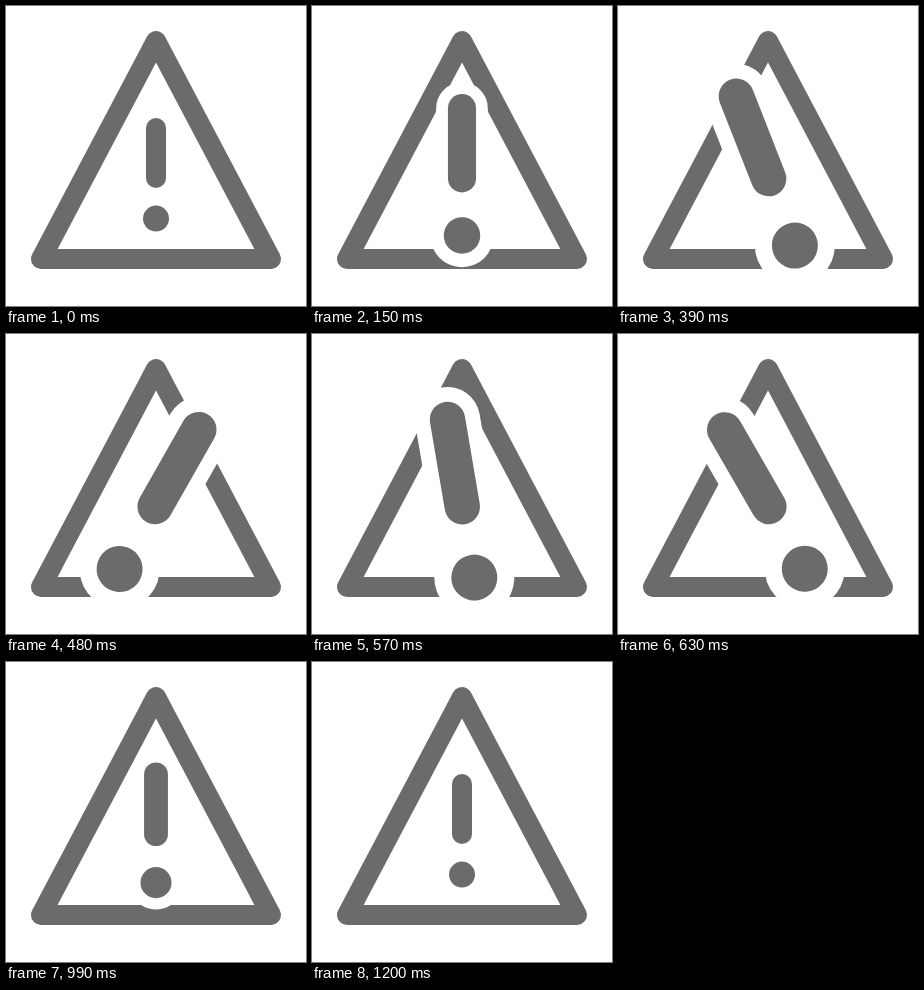
An HTML page for the animation above (3230 ms loop, 300 px wide and 300 px high).

```html
<!DOCTYPE html>
<html lang="en">
<head>
<meta charset="utf-8">
<title>Alert</title>
<style>
  html, body { margin: 0; height: 100%; overflow: hidden; background: #fff; }
  svg { display: block; width: 100%; height: 100%; }
  path { fill: none; stroke-linecap: round; stroke-linejoin: round; }
</style>
</head>
<body>
<svg viewBox="0 0 300 300">
  <path d="M150 35L265 253H35Z" stroke="#6b6b6b" stroke-width="20"/>
  <g id="mark">
    <!-- white halo cuts the triangle open -->
    <g fill="#fff" stroke="#fff">
      <path d="M0-49V1" stroke-width="36.8"/>
      <circle cy="41.6" r="22.6" stroke="none"/>
    </g>
    <g fill="#6b6b6b" stroke="#6b6b6b">
      <path d="M0-49V1" stroke-width="20"/>
      <circle cy="41.6" r="13" stroke="none"/>
    </g>
  </g>
</svg>
<script>
const LOOP = 3230, STEP = 30, END = 1200;
const mark = document.getElementById('mark');

// [time in ms, value]
const scaleKeys = [[0, 1], [290, 1.77], [780, 1.77], [1092, 1]];
const angleKeys = [[240, 0], [360, -30], [486, 30], [624, -30], [864, 0]];

const smooth = u => u * u * (3 - 2 * u);

function valueAt(keys, t) {
  if (t <= keys[0][0]) return keys[0][1];
  for (let i = 1; i < keys.length; i++) {
    const [t0, a] = keys[i - 1], [t1, b] = keys[i];
    if (t < t1) return a + (b - a) * smooth((t - t0) / (t1 - t0));
  }
  return keys[keys.length - 1][1];
}

function draw(now) {
  const t = Math.min(END, Math.floor((now % LOOP) / STEP) * STEP);
  const angle = valueAt(angleKeys, t), scale = valueAt(scaleKeys, t);
  mark.setAttribute('transform', `translate(150 171) rotate(${angle}) scale(${scale})`);
}

const start = performance.now();
function tick() {
  draw(performance.now() - start);
  requestAnimationFrame(tick);
}
tick();
</script>
</body>
</html>
```
